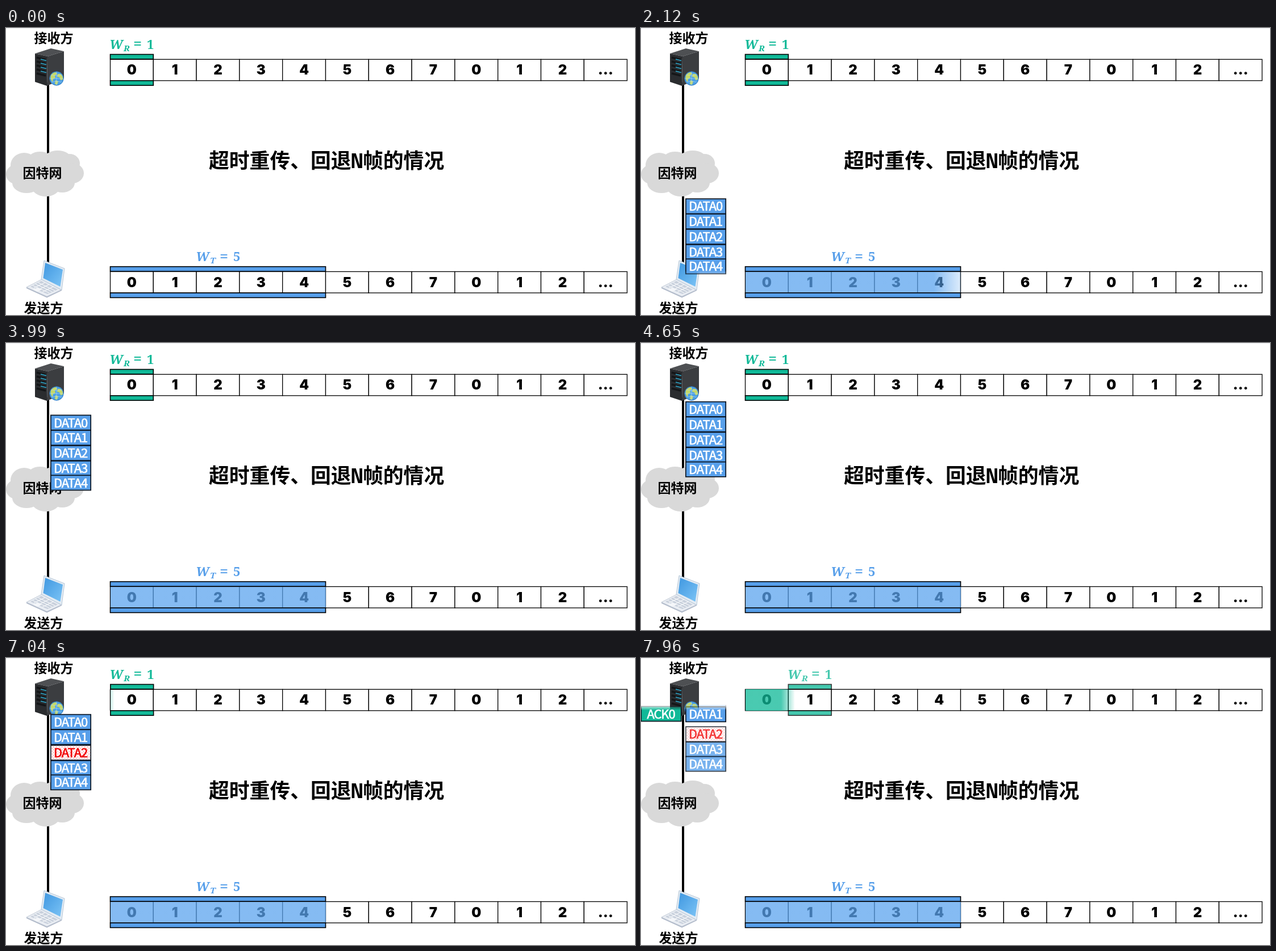
An HTML page that plays this animation: 1107 px wide and 506 px high, repeating every 8 s.

```html
<!DOCTYPE html>
<html lang="zh">
<head>
<meta charset="utf-8">
<style>
html, body { margin: 0; width: 100%; height: 100%; overflow: hidden; background: #fff; }
svg { display: block; width: 1107px; height: 506px; }
text { font-family: "Noto Sans CJK SC", "Noto Sans CJK", sans-serif; }
.label { font-size: 23px; font-weight: 700; text-anchor: middle; }
.title { font-size: 35.8px; font-weight: 700; }
.title .mono { font-family: "Noto Sans Mono", monospace; }
.digit { font: 900 24px Inter, sans-serif; text-anchor: middle; }
.math { font: italic 700 22px "Noto Serif", serif; }
.math .sub { font-size: 15px; }
.math .eq { font-size: 27px; font-style: normal; }
.math .num { font-style: normal; }
.packet rect { stroke: #0b1420; stroke-width: 1.7; }
.packet text { font-size: 22px; letter-spacing: -1.1px; text-anchor: middle; stroke-width: .65; }
</style>
</head>
<body>
<svg id="stage" viewBox="0 0 1107 506">
  <defs>
    <linearGradient id="edge" gradientUnits="userSpaceOnUse" x1="0" x2="0">
      <stop offset="0" stop-color="#fff"/><stop offset="1" stop-color="#000"/>
    </linearGradient>
    <mask id="reveal" maskUnits="userSpaceOnUse" x="0" y="0" width="1107" height="506">
      <rect width="1107" height="506" fill="url(#edge)"/>
    </mask>
    <linearGradient id="blueWipe" gradientUnits="userSpaceOnUse" y1="0" y2="0">
      <stop offset="0" stop-color="#5aa3ee" stop-opacity=".74"/><stop offset="1" stop-color="#5aa3ee" stop-opacity="0"/>
    </linearGradient>
    <linearGradient id="greenWipe" gradientUnits="userSpaceOnUse" y1="0" y2="0">
      <stop offset="0" stop-color="#10b998" stop-opacity=".76"/><stop offset="1" stop-color="#10b998" stop-opacity="0"/>
    </linearGradient>
    <linearGradient id="screen" x1="0" y1="0" x2="1" y2="1">
      <stop offset="0" stop-color="#3f97e0"/><stop offset="1" stop-color="#7cc4f6"/>
    </linearGradient>
    <pattern id="dots" width="5" height="5" patternUnits="userSpaceOnUse">
      <rect width="5" height="5" fill="#fff"/>
      <circle cx="1.2" cy="1.2" r=".8" fill="#f66"/><circle cx="3.7" cy="3.7" r=".8" fill="#f66"/>
    </pattern>
  </defs>
  <rect width="1107" height="506" fill="#fff"/>
  <rect width="1107" height="1" fill="#eceff2"/>
  <rect x="72" y="96" width="4" height="320"/>

  <g id="server">
    <path d="M51 45 79 36 102 41 73 50Z" fill="#4e5053"/>
    <path d="M51 45 73 50 72 102 51 95Z" fill="#2a2c2f"/>
    <path d="M73 50 102 41V89L72 102Z" fill="#3b3d40"/>
    <path d="M54 52l16 4M54 59l16 4M54 66l16 4M54 73l16 4M54 80l16 4" stroke="#141618" stroke-width="3.5"/>
    <path d="M61 55l10 2.5M61 62l10 2.5M61 69l10 2.5M61 76l10 2.5" stroke="#2fa9cc" stroke-width="1.3"/>
    <circle cx="89" cy="89" r="12.5" fill="#4b9fe4"/>
    <path d="M79 83q4-5 9-5l2 3-4 3 1 4-4 2-1 5q-5-4-3-12M91 81l5 0q5 4 4 10l-4 1-2-5-4-1ZM87 92l5 2-2 6-4-1Z" fill="#c5d968"/>
    <path d="M77 89h24M89 77v24M79 82.5q10 3 20 0M79 95.5q10-3 20 0" fill="none" stroke="#b8dcf6" stroke-width=".6"/>
    <circle cx="89" cy="89" r="12" fill="none" stroke="#2d74b8" stroke-width=".8"/>
  </g>
  <g id="cloud" fill="#d9d9d9"></g>
  <g id="laptop">
    <path d="M36 457 63 443 98 462 72 474Z" fill="#e9edf3" stroke="#b7c0ce" stroke-width=".8"/>
    <path d="M36 457 72 473 98 461V463L72 475.500 36 459Z" fill="#b3bccb"/>
    <path d="M43 456 62 446 91 461 73 469Z" fill="#c8d0dc"/>
    <path d="M47 454l29 13M52 451.500l29 13.500M57 449l29 14M49 458.500l19-9.500M56 462l20-10M64 465.500l20-10" stroke="#f7f9fb" stroke-width="1.200"/>
    <path d="M47 461l8-3 8 3-8 4Z" fill="#f4f6f9"/>
    <path d="M67 410 103 424 98 462 62 443Z" fill="#e3ebf3" stroke="#a9bccf" stroke-width=".8"/>
    <path d="M69 414 100 426 95.500 456 65.500 441Z" fill="url(#screen)"/>
  </g>

  <text class="label" x="84" y="26">接收方</text>
  <text class="label" x="64" y="263.500">因特网</text>
  <text class="label" x="66" y="502">发送方</text>
  <text class="title" y="246.500"><tspan x="357">超时重传、回退</tspan><tspan class="mono" x="607">N</tspan><tspan x="628">帧的情况</tspan></text>

  <g id="tables"></g>
  <rect id="sent" x="184" y="430" width="379" height="37" fill="url(#blueWipe)"/>
  <rect id="taken" x="184" y="55" width="86" height="38" fill="url(#greenWipe)"/>
  <g id="sendWindow"></g>
  <g id="receiveWindow"></g>
  <g id="packets" mask="url(#reveal)"></g>
  <g id="burst">
    <path d="M3-34 10-21 30-32 26-18 48-15 33-5 42 6 27 6 31 18 14 14 8 26-4 17-27 34-22 18-41 20-29 10-47 2-25-4-31-19-12-11Z"
      fill="#fb7c78" stroke="#d2625f"/>
    <text transform="rotate(-24)" text-anchor="middle" y="7" font-size="19" font-weight="700" fill="#fff">误码</text>
  </g>
</svg>
<script>
const LOOP = 8000, START = 500, STEP = 133.2;
const CELL = 75.8, LEFT = 183.5;
const GREEN = '#10b998', BLUE = '#579fea';
const $ = id => document.getElementById(id);
const clamp = v => Math.max(0, Math.min(1, v));

function add(parent, tag, attrs, text = '') {
  const node = document.createElementNS('http://www.w3.org/2000/svg', tag);
  set(node, attrs);
  node.textContent = text;
  return parent.appendChild(node);
}
function set(node, attrs) {
  for (const name in attrs) node.setAttribute(name, attrs[name]);
}
const show = (node, visible) => set(node, { visibility: visible ? 'visible' : 'hidden' });

function drawTable(y) {
  const labels = [...'01234567012', '...'];
  labels.forEach((label, i) => {
    const x = LEFT + i * CELL;
    add($('tables'), 'rect', { x, y, width: CELL, height: 37.5, fill: '#fff', stroke: '#000', 'stroke-width': 1.3 });
    add($('tables'), 'text', { class: 'digit', x: x + CELL / 2, y: y + 27 }, label);
  });
}

function drawWindow(group, y, cells, color, labelX, sub, value) {
  for (const barY of [y - 8.8, y + 37.5])
    add(group, 'rect', { x: LEFT, y: barY, width: cells * CELL, height: 8.4, fill: color, stroke: '#000', 'stroke-width': 1.6 });
  const label = add(group, 'text', { class: 'math', fill: color });
  const part = (text, dx, dy, cls) => add(label, 'tspan', { x: labelX + dx, y: y - 18.5 + dy, class: cls }, text);
  part('W', 0, 0, '');
  part(sub, 25, 4, 'sub');
  part('=', 42, 0.5, 'eq');
  part(value, 66, 0, 'num');
}

function makePacket(name, x, fill) {
  const group = add($('packets'), 'g', { class: 'packet' });
  const box = add(group, 'rect', { x: x + 0.8, y: 0.8, width: 70.4, height: 26.2, fill });
  const text = add(group, 'text', { x: x + 35.5, y: 22, fill: '#fff', stroke: '#fff' }, name);
  return { group, box, text };
}

const cloudPuffs = [
  [68, 255, 50, 28], [32, 242, 24, 22], [60, 236, 24, 18], [91, 233, 25, 17], [112, 239, 18, 17],
  [116, 256, 21, 18], [99, 273, 22, 17], [70, 279, 25, 18], [36, 273, 25, 18], [18, 258, 18, 17]
];
for (const [cx, cy, rx, ry] of cloudPuffs) add($('cloud'), 'ellipse', { cx, cy, rx, ry });

drawTable(55.3);
drawTable(429.5);
drawWindow($('receiveWindow'), 55.3, 1, GREEN, 182, 'R', '1');
drawWindow($('sendWindow'), 429.5, 5, BLUE, 334, 'T', '5');

const offsets = [0, 26.7, 53.7, 80.7, 106];
const packets = offsets.map((_, i) => makePacket('DATA' + i, 78, BLUE));
const ack = makePacket('ACK0', -0.5, GREEN);

// Stack height over animation steps: steady rise, rest, eased rise, rest.
const rise = [[0, 442], [13.9, 278], [17, 278], [18, 271], [20, 232], [22, 188], [24, 152],
  [26, 126.5], [28, 111], [30, 104], [32, 101.7]];

function track(keys, at) {
  for (let i = 1; i < keys.length; i++) {
    const [a, from] = keys[i - 1], [b, to] = keys[i];
    if (at <= b) return from + (to - from) * clamp((at - a) / (b - a));
  }
  return keys[keys.length - 1][1];
}

function drawPackets(step, leaving) {
  const top = track(rise, step);
  const enter = (step + 0.8) / 13.4;
  const front = top + 157 * enter;
  if (leaving > 0) set($('edge'), { y1: 92, y2: 82 });
  else if (enter < 1) set($('edge'), { y1: front - 23, y2: front });
  else set($('edge'), { y1: 600, y2: 700 });

  const damaged = step >= 35;
  const pulse = step > 38 && step < 42 ? Math.sin(Math.PI * (step - 38) / 4) : 0;
  packets.forEach(({ group, box, text }, i) => {
    const y = top + offsets[i] - leaving * (i < 2 ? 43 : 35);
    const grow = i === 2 ? 1 + 0.025 * pulse : 1;
    set(group, {
      transform: `translate(114 ${y + 14}) scale(${grow}) translate(-114 -14)`,
      opacity: i < 2 ? 1 : 1 - 0.2 * leaving
    });
    if (i === 2) {
      const ink = damaged ? '#f00000' : '#fff';
      set(box, { fill: damaged ? 'url(#dots)' : BLUE });
      set(text, { fill: ink, stroke: ink });
    }
  });
  show($('packets'), step >= 0);
  show(ack.group, leaving > 0);
  set(ack.group, { transform: `translate(0 ${84.5 - 35 * (1 - leaving)})` });
}

function drawWipes(step, leaving) {
  const sentFront = 184 + 444 * (step + 0.5) / 14;
  set($('blueWipe'), { x1: sentFront - 65, x2: sentFront });
  show($('sent'), step >= 0);
  const takenFront = 184 + 11.5 * (step - 48.4);
  set($('greenWipe'), { x1: takenFront - 25, x2: takenFront });
  show($('taken'), leaving > 0);
}

function drawBurst(step) {
  const scale = track([[34, 0], [35, 0.28], [36, 1.34], [37, 1], [38, 0]], step);
  show($('burst'), scale > 0);
  set($('burst'), { transform: `translate(208.5 170) scale(${scale})` });
}

function render(time) {
  const step = Math.floor((time % LOOP - START) / STEP);
  const leaving = clamp((step - 48.5) / 7.5);
  drawPackets(step, leaving);
  drawWipes(step, leaving);
  drawBurst(step);
  set($('receiveWindow'), {
    transform: `translate(${CELL * leaving ** 2} 0)`,
    opacity: 1 - 0.22 * leaving
  });
}

function tick() {
  render(performance.now());
  requestAnimationFrame(tick);
}
tick();
</script>
</body>
</html>
```
